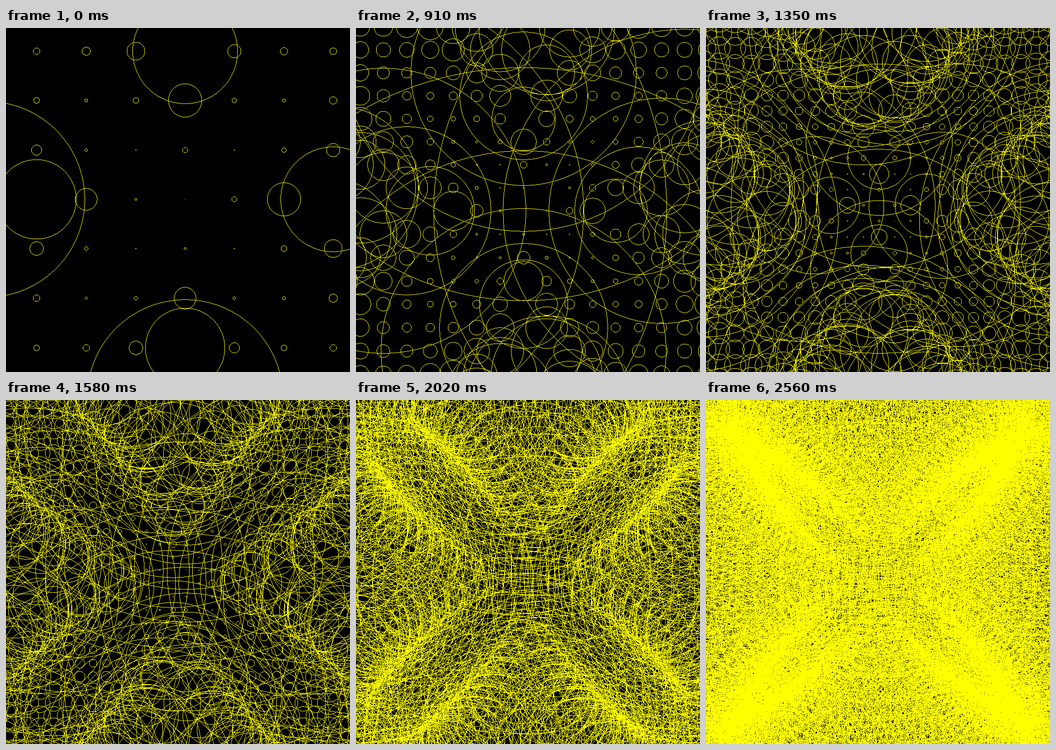
An HTML page with a canvas that plays this animation: 748x748 px, repeating every 2.78 s.

```html
<!DOCTYPE html>
<html lang="en">
<head>
<meta charset="utf-8">
<title>Circle lattice</title>
<style>
  html, body { margin: 0; width: 100%; height: 100%; overflow: hidden; background: #000; }
  canvas { display: block; width: 748px; height: 748px; }
</style>
</head>
<body>
<canvas id="stage" width="748" height="748"></canvas>
<script>
const SIZE = 748, LOOP = 2780;
const STARTS = [0, 100, 210, 330, 440, 560, 670, 790, 910, 1020, 1140, 1260,
  1350, 1470, 1580, 1680, 1800, 1900, 2020, 2140, 2240, 2340, 2440, 2560];
const LEFT = -42, BOTTOM = 803;     // corner where the lattice begins
const MID = 415.5, SPAN = 831;      // centre and extent, measured from that corner
const GAP = 107.3, GROWTH = 1.1, GAIN = 0.00497;
const BLACK = 0xff000000, YELLOW = 0xff00ffff;

const ctx = document.getElementById('stage').getContext('2d');
const image = ctx.createImageData(SIZE, SIZE);
const pixels = new Uint32Array(image.data.buffer);

function plot(x, y) {
  if (x >= 0 && x < SIZE && y >= 0 && y < SIZE) pixels[y * SIZE + x] = YELLOW;
}

// Hard-edged one pixel outline: flat arcs by column, steep arcs by row.
function circle(cx, cy, r) {
  const h = r * Math.SQRT1_2;
  const reach = (c, put) => {
    const from = Math.max(Math.ceil(c - h), 0);
    const to = Math.min(Math.floor(c + h), SIZE - 1);
    for (let p = from; p <= to; p++) {
      put(p, Math.round(Math.sqrt(r * r - (p - c) * (p - c))));
    }
  };
  reach(cx, (x, d) => { plot(x, cy - d); plot(x, cy + d); });
  reach(cy, (y, d) => { plot(cx - d, y); plot(cx + d, y); });
}

// The cells before the centre are slightly wider than those after it.
function lattice(step, gap) {
  const wide = gap + 0.67 - 0.03 * Math.cos(step * Math.PI / 4);
  const list = [];
  for (let u = 0; u <= SPAN; u += u + wide < MID ? wide : gap) list.push(u);
  return list;
}

function draw(step) {
  const gap = GAP / GROWTH ** step;
  const marks = lattice(step, gap);
  pixels.fill(BLACK);
  for (const u of marks) {
    for (const v of marks) {
      const a = Math.abs(u - MID) || 1e-6, b = Math.abs(v - MID) || 1e-6;
      const r = GAIN / gap * Math.hypot(a ** 3 / b, b ** 3 / a);
      if (r < 1e6) circle(Math.round(LEFT + u), Math.round(BOTTOM - v), r);
    }
  }
  ctx.putImageData(image, 0, 0);
}

let shown = -1;
const begin = performance.now();
function tick() {
  const t = (performance.now() - begin) % LOOP;
  let step = STARTS.length - 1;
  while (t < STARTS[step]) step--;
  if (step !== shown) draw(shown = step);
  requestAnimationFrame(tick);
}
tick();
</script>
</body>
</html>
```
